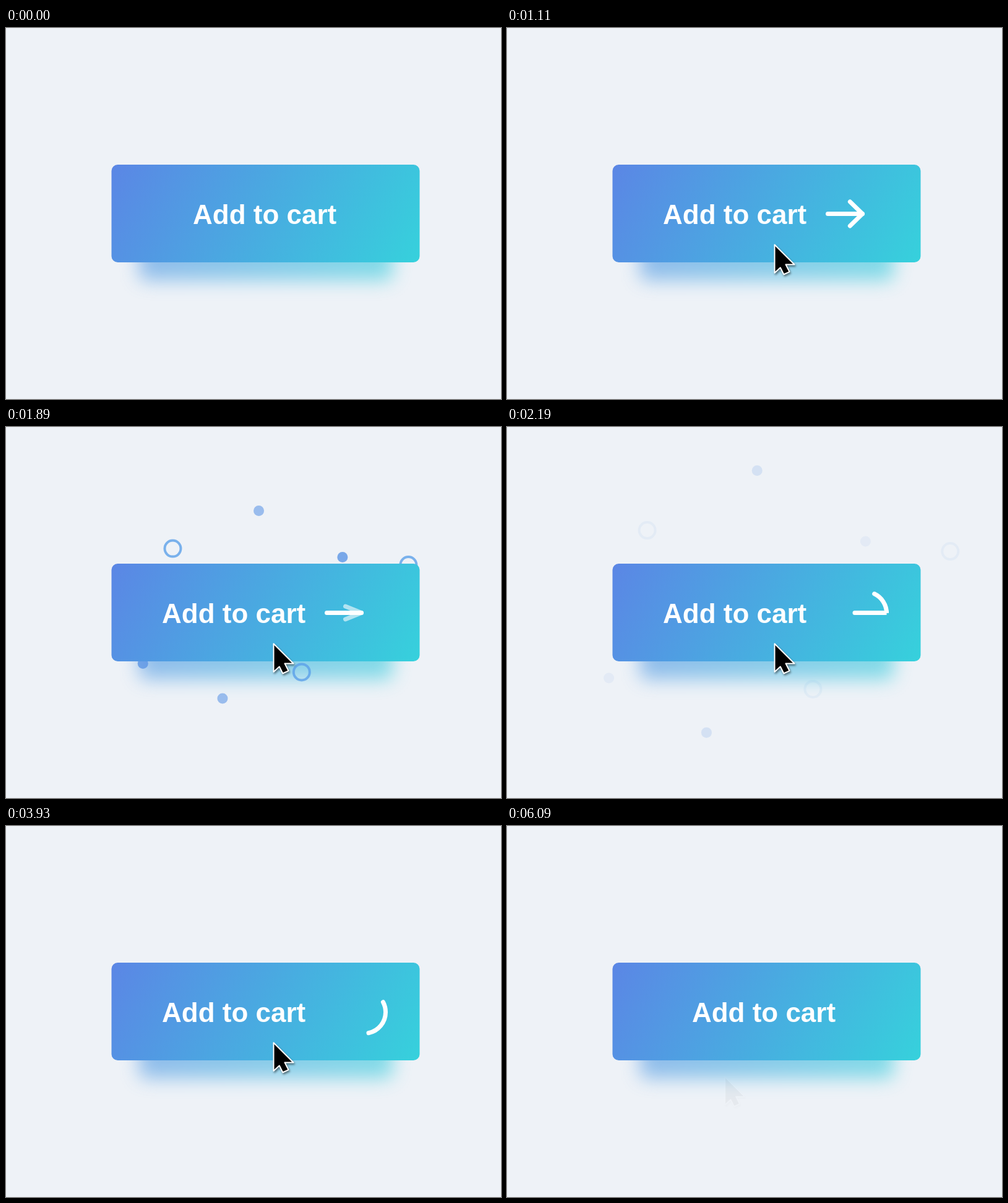
An HTML page that plays this animation: 800x600 px, repeating every 6.33 s.

```html
<!DOCTYPE html>
<html lang="en">
<head>
<meta charset="utf-8">
<title>Add to cart</title>
<style>
  html, body { margin: 0; width: 100%; height: 100%; overflow: hidden; background: #eef2f7; }
  svg { display: block; width: 800px; height: 600px; }
  text { font: bold 44px "Liberation Sans", Arial, sans-serif; fill: #fff; }
  #icon { fill: none; stroke: #fff; stroke-width: 7; stroke-linecap: round; }
</style>
</head>
<body>
<svg viewBox="0 0 800 600">
  <defs>
    <linearGradient id="sky" gradientUnits="userSpaceOnUse" x1="198.5" y1="172.4" x2="640.5" y2="427.6">
      <stop stop-color="#5b86e5"/><stop offset="1" stop-color="#36d1dc"/>
    </linearGradient>
    <filter id="blur" x="-20%" y="-40%" width="140%" height="180%" color-interpolation-filters="sRGB">
      <feGaussianBlur stdDeviation="15"/>
    </filter>
    <filter id="drop" x="-30%" y="-30%" width="180%" height="180%" color-interpolation-filters="sRGB">
      <feDropShadow dx="1.5" dy="2.5" stdDeviation="1.5" flood-opacity=".45"/>
    </filter>
  </defs>
  <rect x="215" y="270" width="410" height="138" rx="10" fill="url(#sky)" opacity=".6" filter="url(#blur)"/>
  <g id="burst"></g>
  <rect x="170.5" y="221" width="498" height="158" rx="10" fill="url(#sky)"/>
  <text id="label" x="302" y="317">Add to cart</text>
  <g id="icon">
    <path id="head" stroke-linejoin="round"/>
    <path id="stroke"/>
  </g>
  <g id="cursor">
    <path d="M0 0V45.5L9.3 37L14.8 48L24 43.8L18 32H32Z" fill="#000" stroke="#fff" stroke-width="2"
      stroke-linejoin="round" filter="url(#drop)"/>
  </g>
</svg>
<script>
const LOOP = 6330, HOLD = 6090, CLICK = 1620;
const $ = id => document.getElementById(id);
const clamp = v => Math.min(1, Math.max(0, v));
const progress = (t, start, length) => clamp((t - start) / length);
const easeOut = p => 1 - (1 - p) ** 2;
const smooth = p => p * p * (3 - 2 * p);

// Piecewise linear value from [time, value] pairs.
function track(t, keys) {
  const i = keys.findIndex(k => k[0] > t);
  if (i === 0) return keys[0][1];
  if (i < 0) return keys[keys.length - 1][1];
  const [t0, v0] = keys[i - 1], [t1, v1] = keys[i];
  return v0 + (v1 - v0) * (t - t0) / (t1 - t0);
}

// One line: arrow shaft, two and a half turns, then the check mark.
const half = x => `A34.5 34.5 0 0 0 ${x} 301`;
$('stroke').setAttribute('d', 'M518.5 300.5H613.5V301' +
  [544.5, 613.5, 544.5, 613.5, 544.5].map(half).join('') + 'L546.7 300.5L560.8 315.2L594 287');
const total = $('stroke').getTotalLength();
const tailKeys = [[1900, 0], [2850, 142], [3930, 481], [4230, 566], [4530, total - 64]];
const frontKeys = [[1900, 56], [2850, 312], [3930, 545], [4260, 625], [4890, total - 18], [4980, total]];

// Travel from the button centre: dx, dy, duration, ring or dot.
const particles = [
  [-15.5, -233, 700, false], [160, -115, 600, false],
  [-255, 106, 600, false], [-98.5, 197, 700, false],
  [-193, -133, 600, true], [297, -99, 600, true], [75, 124, 600, true]
].map(([dx, dy, duration, ring]) => {
  const el = document.createElementNS('http://www.w3.org/2000/svg', 'circle');
  el.setAttribute('r', ring ? 13 : 8.5);
  el.setAttribute('fill', ring ? 'none' : '#5b94e5');
  if (ring) {
    el.setAttribute('stroke', '#5ba0e8');
    el.setAttribute('stroke-width', 4);
  }
  $('burst').append(el);
  return { el, dx, dy, duration };
});

function drawBurst(t) {
  for (const { el, dx, dy, duration } of particles) {
    const p = progress(t, CLICK, duration);
    const reach = 1 - (1 - p) ** 2.5;
    const strength = duration === 700 ? 0.95 : 1.45;
    el.setAttribute('cx', 419.5 + dx * reach);
    el.setAttribute('cy', 300 + dy * reach);
    el.setAttribute('opacity', p > 0 ? Math.min(1, (1 - p) * strength) : 0);
  }
}

function drawIcon(t, hover) {
  const fold = progress(t, 1680, 420);
  const angle = 0.77 * (1 - fold), dx = 28 * Math.cos(angle), dy = 28 * Math.sin(angle);
  $('head').setAttribute('d', `M${574.5 - dx} ${300.5 - dy}L574.5 300.5L${574.5 - dx} ${300.5 + dy}`);
  $('head').setAttribute('opacity', (1 - fold) ** 0.75);

  const tail = track(t, tailKeys);
  $('stroke').setAttribute('stroke-dasharray', `${track(t, frontKeys) - tail} 2000`);
  $('stroke').setAttribute('stroke-dashoffset', -tail);
  const leave = progress(t, 5940, 130);
  $('icon').setAttribute('opacity', hover * (1 - leave));
  $('icon').setAttribute('transform', `translate(${t < CLICK ? -20 * (1 - hover) : 0})`);
}

function drawCursor(t) {
  const enter = smooth(progress(t, 720, 360)), leave = progress(t, 5940, 155);
  const x = 432.5 - 52 * (1 - enter) - 83 * leave;
  const y = 350.5 + 108 * (1 - enter) + 57 * leave;
  $('cursor').setAttribute('transform', `translate(${x} ${y})`);
  $('cursor').setAttribute('opacity', progress(t, 720, 150) * (1 - leave));
}

function draw(t) {
  const hover = easeOut(progress(t, 890, 220)) - easeOut(progress(t, 5940, 200));
  $('label').setAttribute('transform', `translate(${-50 * hover})`);
  drawBurst(t);
  drawIcon(t, hover);
  drawCursor(t);
}

const start = performance.now();
function tick() {
  const t = (performance.now() - start) % LOOP;
  draw(t < 750 ? 0 : Math.min(t, HOLD));
  requestAnimationFrame(tick);
}
tick();
</script>
</body>
</html>
```
